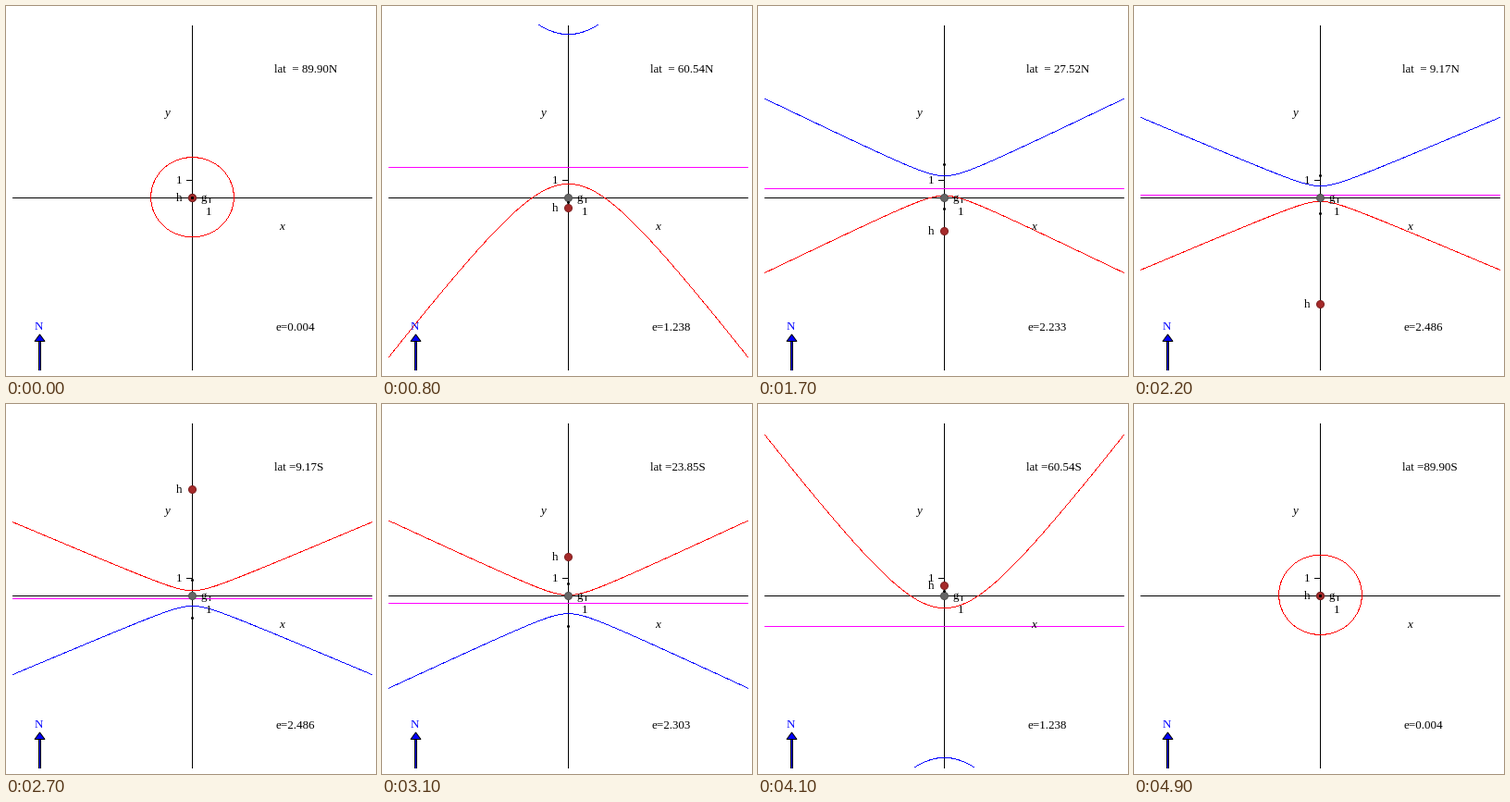
These frames come from a looping animation (400x400 px, 5000 ms). A matplotlib script:

```python
import numpy as np
import matplotlib.pyplot as plt
from matplotlib.animation import FuncAnimation
from matplotlib.patches import Circle, Polygon

FRAMES, INTERVAL = 50, 100
DPI = 100
PX = 72 / DPI                      # points per pixel
CX, CY, UX, UY = 201, 207, 19.4, 18.65
LIMIT = 10
TILT = np.radians(23.4)

plt.rcParams.update({
    "font.family": "Liberation Serif",
    "font.size": 13 * PX,
    "path.simplify": False,
})

fig = plt.figure(figsize=(400 / DPI, 400 / DPI), dpi=DPI, facecolor="white")
ax = fig.add_axes([0, 0, 1, 1])
ax.set(xlim=(0, 400), ylim=(400, 0))
ax.axis("off")


def line(xs, ys, color="black", width=1, z=2):
    return ax.plot(xs, ys, color=color, lw=width * PX, antialiased=False,
                   solid_capstyle="butt", snap=True, zorder=z)[0]


def pixels(color):
    return ax.plot([], [], ",", color=color, zorder=3)[0]


def dot(radius, fill, edge, z):
    patch = Circle((CX + 0.5, CY + 0.5), radius, facecolor=fill,
                   edgecolor=edge, lw=PX, zorder=z)
    return ax.add_patch(patch)


def label(x, baseline, text, ha="center", **style):
    return ax.text(x, baseline, text, ha=ha, va="baseline", zorder=9, **style)


def trace(artist, x, y):
    """Show a densely sampled curve as a chain of single pixels."""
    inside = (abs(x) <= LIMIT) & (abs(y) <= LIMIT)
    px, py = CX + UX * x, CY - UY * y
    steep = abs(np.gradient(py)) > abs(np.gradient(px))
    major = np.where(steep, py, px)
    keep = inside & (abs(major - np.round(major)) < 0.1)
    artist.set_data(np.round(px[keep]), np.round(py[keep]))


def place(patch, y):
    patch.set_visible(abs(y) <= LIMIT)
    patch.center = (CX + 0.5, np.round(CY - UY * y) + 0.5)


# Axes, ticks and fixed labels
line([7, 395], [CY, CY])
line([CX, CX], [21, 393])
line([220, 220], [CY, 212])
line([195, CX], [188, 188])
label(219.5, 226, "1")
label(187.5, 192, "1")
label(213.5, 211, "g")
label(298, 242, "x", style="italic")
label(173.5, 119, "y", style="italic")

# North arrow
line([36, 36], [393, 360], "black", 3)
line([36, 36], [393, 360], "blue", 1)
ax.add_patch(Polygon([(36.5, 355), (31, 362.5), (42, 362.5)],
                     facecolor="blue", edgecolor="black", lw=PX, zorder=3))
label(35.5, 350, "N", color="blue")

# Moving parts
equinox = line([], [], "magenta", z=3)
main_curve = pixels("red")
other_curve = pixels("blue")
dot(4, "#666666", "#505050", 4)
pole_dot = dot(4, "#a52a2a", "#802020", 5)
focus_dots = [dot(1.5, "black", "none", 6) for _ in range(2)]
pole_text = label(187.5, 211, "h")
lat_text = label(290, 72, "", ha="left")
ecc_text = label(291, 351, "", ha="left")

sweep = np.linspace(-LIMIT, LIMIT, 8001)
turn = np.linspace(0, 2 * np.pi, 20001)


def update(i):
    lat = 89.9 - 179.8 * i / (FRAMES - 1)
    phi = np.radians(lat)
    tilt = np.copysign(TILT, lat)
    ecc = np.cos(phi) / np.sin(TILT)

    # Conic traced by the shadow of a unit rod
    near, far = np.tan(phi - tilt), np.tan(phi + tilt)
    mid, half = (near + far) / 2, (near - far) / 2
    width = abs(half) * np.sqrt(abs(ecc**2 - 1))
    if ecc < 1:
        trace(main_curve, width * np.sin(turn), mid + half * np.cos(turn))
        other_curve.set_data([], [])
    else:
        bend = half * np.sqrt(1 + (sweep / width) ** 2)
        trace(main_curve, sweep, mid + bend)
        trace(other_curve, sweep, mid - bend)

    level = np.tan(phi)
    equinox.set_visible(abs(level) <= LIMIT)
    equinox.set_data([7, 395], [CY - UY * level] * 2)

    for patch, side in zip(focus_dots, (1, -1)):
        place(patch, mid + side * half * ecc)

    pole = -1 / level
    place(pole_dot, pole)
    pole_text.set_visible(abs(pole) <= LIMIT)
    pole_text.set_y(CY - UY * pole + 4)

    lat_text.set_text(f"lat  = {lat:.2f}N" if lat > 0 else f"lat ={-lat:.2f}S")
    ecc_text.set_text(f"e={ecc:.3f}")
    return ()


anim = FuncAnimation(fig, update, frames=FRAMES, interval=INTERVAL,
                     init_func=lambda: update(0), repeat=True, repeat_delay=0)
plt.show()
```
